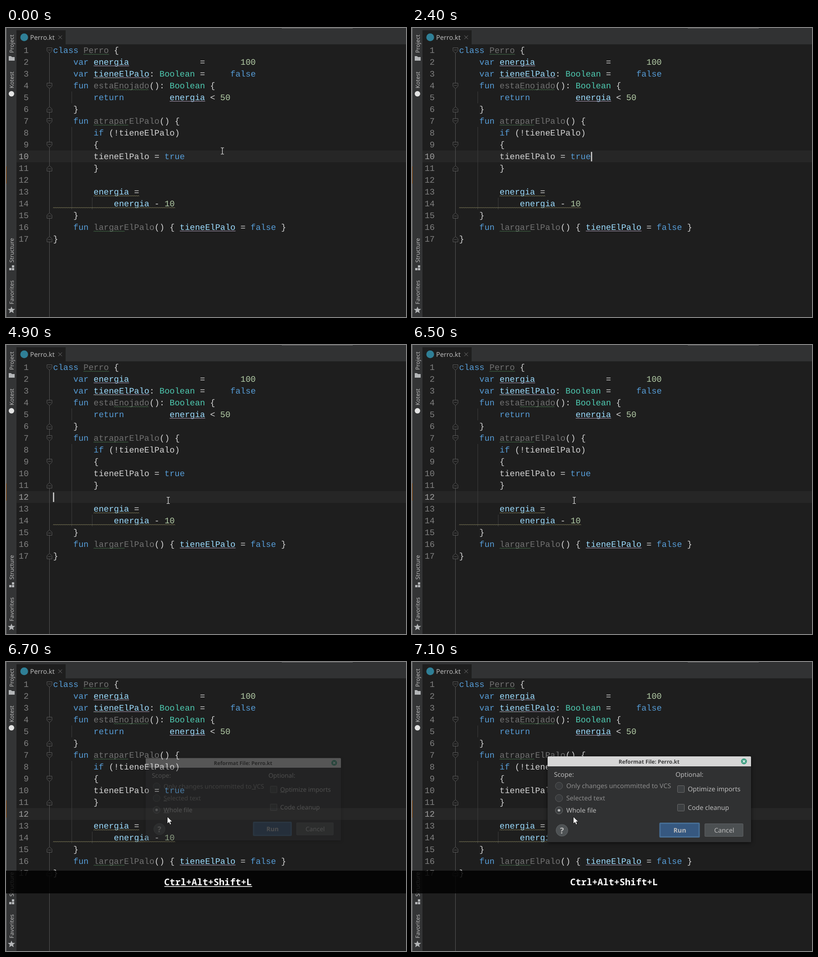
These frames come from a looping animation (879 px wide and 637 px high, 8000 ms). An HTML page:

```html
<!DOCTYPE html>
<html lang="es">
<head>
<meta charset="utf-8">
<title>Reformat File</title>
<style>
  html, body { margin: 0; width: 100%; height: 100%; overflow: hidden; background: #1e1e1e; }
  svg { display: block; width: 879px; height: 637px; }
  text { white-space: pre; text-rendering: geometricPrecision; font-family: "Noto Sans", "Open Sans", sans-serif; }
  .code text { font: 18.56px "Liberation Mono", monospace; fill: #d4d4d4; }
  .code .n { fill: #808080; text-anchor: end; }
  .code .n.current { fill: #a0a0a0; }
  .k { fill: #569cd6; }
  .v { fill: #9cdcfe; }
  .t { fill: #4ec9b0; }
  .d { fill: #b5cea8; }
  .u { fill: #717171; }
  .wave { fill: none; stroke-width: 1; }
  .side text { font-size: 12.4px; fill: #bbb; }
  .icon { fill: #b4b6b8; }
  .ui text { font-size: 14.2px; fill: #bbb; }
  .ui .off { fill: #8c8c8c; }
  .ui .mid { text-anchor: middle; }
  .box { fill: #3c3f41; stroke: #6b6b6b; }
</style>
</head>
<body>
<svg viewBox="0 0 879 637">
  <rect width="879" height="637" fill="#1e1e1e"/>
  <rect id="lineGlow" x="23" width="856" height="26" fill="#262626"/>

  <!-- tab bar -->
  <rect width="879" height="36" fill="#313233"/>
  <rect x="606" width="156" height="1" fill="#6a6a6a"/>
  <rect x="23" y="5" width="108" height="32" fill="#1e1e1e"/>
  <circle cx="40" cy="20.5" r="8.5" fill="#2f7f96"/>
  <text x="53" y="25.5" font-size="14.4" fill="#bbb">Perro.kt</text>
  <path d="M115 16.5l8 8m0-8l-8 8" stroke="#777"/>

  <!-- side bar -->
  <g class="side">
    <rect width="23" height="637" fill="#333435"/>
    <rect width="1" height="637" fill="#77787a"/>
    <rect y="305" width="1" height="38" fill="#b5651d"/>
    <text transform="translate(17 55) rotate(-90)">Project</text>
    <text transform="translate(17 133) rotate(-90)">Kotest</text>
    <text transform="translate(17 517) rotate(-90)">Structure</text>
    <text transform="translate(17 609) rotate(-90)">Favorites</text>
    <path class="icon" d="M6 62h5l2 2h6v8H6z"/>
    <circle cx="12" cy="145" r="6" fill="#e4e4e4"/>
    <path class="icon" d="M13 523h5v5h-5zM7 529h5v5H7zM13 529h5v5h-5z"/>
    <path class="icon" d="M12 614l2 5 6 .4-4.500 3.600 1.500 5.500-5-3-5 3 1.500-5.500L4 619.400l6-.4z"/>
  </g>

  <g class="code" id="code">
    <path d="M95.500 49V637" stroke="#555"/>
    <path d="M144.500 140v26M144.500 218v182M189.500 374v26" stroke="#3c3c3c"/>
  </g>
  <rect id="caret" width="2.500" height="21" fill="#d4d4d4"/>

  <!-- pressed keys -->
  <g id="keys">
    <rect y="460" width="879" height="50" opacity=".84"/>
    <text x="347.500" y="491.500" fill="#fff" style="font:bold 20.100px 'Noto Sans Mono',monospace">Ctrl+Alt+Shift+L</text>
    <rect id="keysLine" x="348" y="494" width="193" height="1.500" fill="#fff"/>
  </g>

  <g class="ui" id="dialog">
    <rect x="298" y="208" width="447" height="189" fill="#303132" style="filter:drop-shadow(0 2px 4px #0009)"/>
    <path d="M298 230v-20q0-2 2-2h443q2 0 2 2v20z" fill="#d6d6d6"/>
    <text class="mid" x="521" y="224" style="font-size:11.800px;font-weight:bold;fill:#3c3c3c">Reformat File: Perro.kt</text>
    <circle cx="729.500" cy="219" r="6.500" fill="#3fa083"/>
    <path d="M727 216.500l5 5m0-5l-5 5" stroke="#fff" stroke-width="1.300"/>
    <text x="312" y="253">Scope:</text>
    <text x="579" y="253">Optional:</text>
    <circle class="box" cx="323" cy="273" r="8" opacity=".7"/>
    <circle class="box" cx="323" cy="300" r="8" opacity=".7"/>
    <circle class="box" cx="323" cy="327" r="8"/>
    <circle cx="323" cy="327" r="2.800" fill="#bbb"/>
    <text class="off" x="339" y="278">Only changes uncommitted to VCS</text>
    <text class="off" x="339" y="305">Selected text</text>
    <text x="339" y="332">Whole file</text>
    <rect class="box" x="583.500" y="272.500" width="15" height="15" rx="1"/>
    <rect class="box" x="583.500" y="313.500" width="15" height="15" rx="1"/>
    <text x="606" y="285">Optimize imports</text>
    <text x="606" y="326">Code cleanup</text>
    <path id="mnemonics" d="M541 279.500h9M339 306.500h8M339 333.500h13M606 286.500h11" stroke="#aaa"/>
    <circle cx="329.500" cy="371" r="13" fill="#4e5254" stroke="#606365"/>
    <text class="mid" x="329.500" y="377.500" style="font-size:18px;font-weight:600">?</text>
    <rect x="545" y="355.500" width="86" height="30" rx="1" fill="#365880" stroke="#466d94" stroke-width="3"/>
    <text class="mid" x="588.500" y="376" font-weight="bold">Run</text>
    <rect x="643.500" y="356.500" width="84" height="28" rx="1" fill="#4c5052" stroke="#5e6163"/>
    <text class="mid" x="686" y="376">Cancel</text>
  </g>

  <path id="beam" d="M-3.500-7h2.500l1 1 1-1h2.500M0-6V6M-3.500 7h2.500l1-1 1 1h2.500" fill="none" stroke="#e8e8e8" stroke-width="1.200"/>
  <path id="arrow" d="M354.500 341v15.500l3.600-3.400 2.400 5.400 2.600-1.200-2.400-5.300h4.800z" fill="#fff" stroke="#000" stroke-width=".8"/>
</svg>
<script>
const LOOP = 8000, LEFT = 103.5, CHAR = 11.138, ROW = 26;
const el = id => document.getElementById(id);
const colX = col => LEFT + col * CHAR;
const baseline = line => 29 + line * ROW;

// Coloured pieces stand between bars as "class:text".
const source = [
  '|k:class| |u:Perro| {',
  '    |k:var| |v:energia|              =       |d:100|',
  '    |k:var| |v:tieneElPalo|: |t:Boolean| =     |k:false|',
  '    |k:fun| |u:estaEnojado|(): |t:Boolean| {',
  '        |k:return|         |v:energia| < |d:50|',
  '    }',
  '    |k:fun| |u:atraparElPalo|() {',
  '        |k:if| (!tieneElPalo)',
  '        {',
  '        tieneElPalo = |k:true|',
  '        }',
  '',
  '        |v:energia| =',
  '            |v:energia| - |d:10|',
  '    }',
  '    |k:fun| |u:largarElPalo|() { |v:tieneElPalo| = |k:false| }',
  '}'
];

const paint = piece => piece.replace(/</g, '&lt;');
const codeLine = (text, i) => {
  const spans = text.split('|').map((piece, j) =>
    j % 2 ? `<tspan class="${piece[0]}">${paint(piece.slice(2))}</tspan>` : paint(piece)).join('');
  const y = baseline(i + 1);
  return `<text class="n" x="50" y="${y}">${i + 1}</text><text x="${LEFT}" y="${y}">${spans}</text>`;
};

const wave = (line, col, length, color) => {
  const steps = Math.round(length * CHAR / 4);
  return `<path class="wave" stroke="${color}" d="M${colX(col)} ${baseline(line) + 4}${'l2-2l2 2'.repeat(steps)}"/>`;
};
const underline = (line, col, length) =>
  `<path stroke="#a99bb5" d="M${colX(col)} ${baseline(line) + 2.5}h${length * CHAR}"/>`;
const fold = (line, flip) =>
  `<g transform="translate(95.5 ${baseline(line) - 5.5}) scale(1 ${flip})" fill="#1e1e1e" stroke="#5a5a5a">
   <path d="M-5.500-6h11v7l-5.500 5-5.500-5z"/><path d="M-3-1h6"/></g>`;

const TYPO = '#4a7a50', WEAK = '#8f8a62';
el('code').innerHTML += [
  ...[1, 4, 7, 9].map(line => fold(line, 1)),
  ...[6, 11, 15, 17].map(line => fold(line, -1)),
  ...source.map(codeLine),
  wave(1, 6, 5, TYPO), wave(3, 8, 5, TYPO), wave(4, 12, 7, TYPO),
  wave(7, 8, 7, TYPO), wave(16, 8, 6, TYPO),
  wave(13, 8, 9, WEAK), wave(14, 0, 24, WEAK),
  underline(2, 8, 7), underline(3, 8, 11), underline(5, 23, 7), underline(16, 25, 11)
].join('');
const numbers = [...document.querySelectorAll('.n')];

const caretToggles = [300, 800, 1500, 1900, 2400, 2900, 3400, 3900, 4500, 5400, 6000, 6500];
// Text pointer: time, x, y; a time alone hides it.
const beamSteps = [
  [0, 475.5, 271], [200], [3500, 605, 384], [3700, 520, 372], [3800, 410, 350],
  [3900, 368.5, 342.5], [4500, 363, 342.5], [4600, 358, 342.5], [4700, 356.5, 342.5], [6600]
];

const show = (id, visible) => el(id).style.display = visible ? '' : 'none';

function draw(t) {
  const line = t < 4900 ? 10 : 12;
  el('lineGlow').setAttribute('y', 10 + line * ROW);
  numbers.forEach((n, i) => n.classList.toggle('current', i + 1 === line));

  show('caret', caretToggles.filter(time => time <= t).length % 2);
  el('caret').setAttribute('x', line === 10 ? 393.3 : 103.3);
  el('caret').setAttribute('y', 13 + line * ROW);

  const [, x, y] = beamSteps.findLast(step => step[0] <= t);
  show('beam', x !== undefined);
  if (x !== undefined) el('beam').setAttribute('transform', `translate(${x} ${y})`);
  show('arrow', t >= 6600);

  show('keys', t >= 6600);
  show('keysLine', t < 6800);

  const opening = t < 6800;
  show('dialog', t >= 6700);
  el('dialog').setAttribute('opacity', opening ? 0.3 : 1);
  el('dialog').setAttribute('transform',
    `translate(521.5 302.5) scale(${opening ? 0.96 : 1}) translate(-521.5 -302.5)`);
  el('mnemonics').setAttribute('opacity', t < 7000 ? 1 : t < 7100 ? 0.5 : 0);
}

const start = performance.now();
function tick() {
  draw((performance.now() - start) % LOOP);
  requestAnimationFrame(tick);
}
tick();
</script>
</body>
</html>
```
